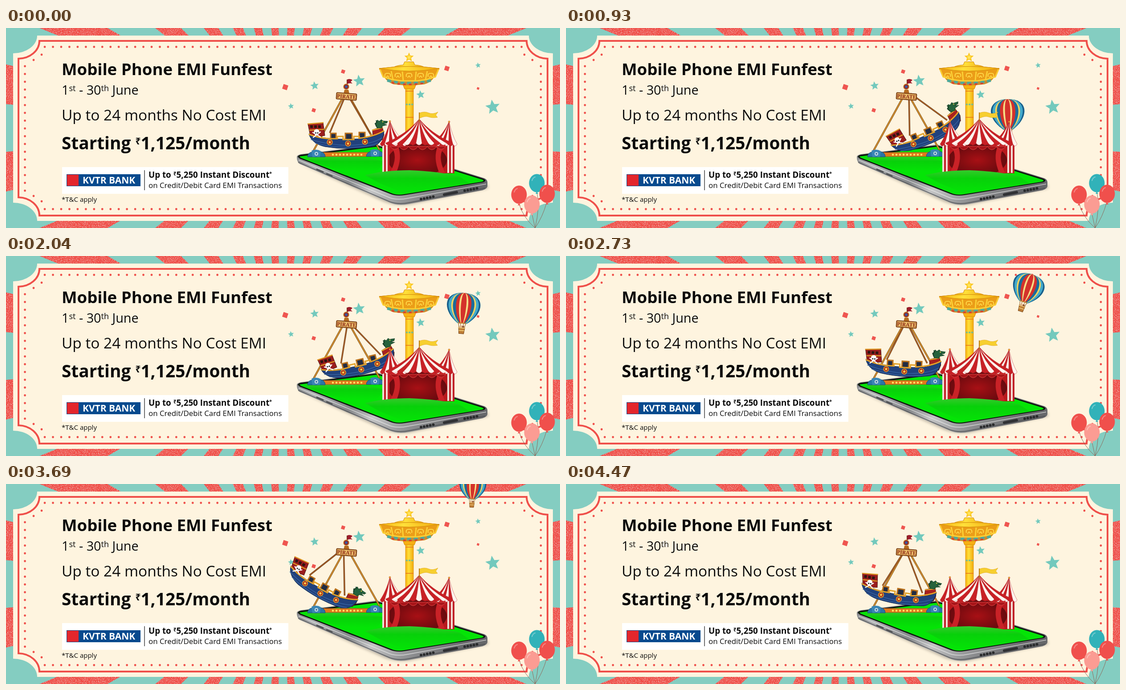
Recreate the animation shown at these times as an HTML page. Size 1244 px wide and 450 px high, loop 4.5 s.

```html
<!DOCTYPE html>
<html lang="en">
<head>
<meta charset="utf-8">
<title>Phone instalment offer</title>
<style>
  html, body { margin: 0; width: 100%; height: 100%; overflow: hidden; background: #84cdc1; }
  svg { position: absolute; left: 0; top: 0; width: 1244px; height: 450px; }
  #back { will-change: transform; }
  text { font-family: "Open Sans", "Noto Sans", sans-serif; font-weight: 500; fill: #0b0b0b; }
  .bold { font-weight: 700; }
</style>
</head>
<body>
<svg id="back" viewBox="0 0 1244 450">
  <defs>
    <filter id="speckle" x="0" y="0" width="100%" height="100%">
      <feTurbulence type="fractalNoise" baseFrequency=".7" numOctaves="2" seed="4"/>
      <feColorMatrix values="0 0 0 0 .86  0 0 0 0 .48  0 0 0 0 .45  7 0 0 0 -3.9"/>
      <feComposite in2="SourceAlpha" operator="in" result="dots"/>
      <feMerge><feMergeNode in="SourceGraphic"/><feMergeNode in="dots"/></feMerge>
    </filter>
  </defs>
  <rect width="1244" height="450" fill="#84cdc1"/>
  <path id="rays" fill="#ef4f4a" filter="url(#speckle)"/>
  <path fill="#fef4df" d="M70 17H1174A54 40 0 0 0 1228 57V393A54 41 0 0 0 1174 434H70A54 41 0 0 0 16 393V57A54 40 0 0 0 70 17Z"/>
  <path fill="none" stroke="#ef4f4a" stroke-width="4" d="M75 29H1169A48 40 0 0 0 1216 69V381A48 41 0 0 0 1169 422H75A48 41 0 0 0 28 381V69A48 40 0 0 0 75 29Z"/>
  <g id="beads" fill="#ef4f4a"></g>

  <text class="bold" x="125" y="106" font-size="36.6">Mobile Phone EMI Funfest</text>
  <text y="150" font-size="28.8"><tspan x="125">1</tspan><tspan font-size="18" dy="-8">st</tspan><tspan dy="8"> - 30</tspan><tspan font-size="18" dy="-8">th</tspan><tspan dy="8"> June</tspan></text>
  <text x="125" y="208" font-size="33.4">Up to 24 months No Cost EMI</text>
  <text class="bold" x="125" y="273" font-size="38.8">Starting <tspan font-size="21" dy="-11">₹</tspan><tspan dy="11">1,125/month</tspan></text>
  <rect x="126" y="313" width="508" height="60" fill="#fff"/>
  <rect x="136" y="329" width="166" height="27" fill="#064a8e"/>
  <rect x="137" y="330" width="26" height="25" fill="#e3262c"/>
  <text class="bold" x="172" y="350" font-size="21" style="fill:#fff">KVTR BANK</text>
  <path d="M311 320V365" stroke="#222" stroke-width="1.3"/>
  <text class="bold" x="320" y="337" font-size="18.8">Up to <tspan font-size="12" dy="-5">₹</tspan><tspan dy="5">5,250 Instant Discount</tspan><tspan font-size="10" dy="-6">*</tspan></text>
  <text x="320" y="360" font-size="16.9">on Credit/Debit Card EMI Transactions</text>
  <text x="125" y="391" font-size="15">*T&amp;C apply</text>

  <g id="confetti"></g>
  <g stroke="#8d6a5c" fill="none">
    <path d="M1152 395Q1160 425 1188 450M1192 369Q1200 400 1188 450M1214 393Q1205 425 1188 450M1181 418L1188 450"/>
  </g>
  <g id="party"></g>
</svg>

<svg viewBox="0 0 1244 450">
  <defs>
    <linearGradient id="gold">
      <stop offset="0" stop-color="#f5ae10"/><stop offset=".4" stop-color="#ffe03a"/><stop offset="1" stop-color="#f0a80e"/>
    </linearGradient>
    <linearGradient id="metal" x2="1" y2=".4">
      <stop offset="0" stop-color="#6f7073"/><stop offset=".2" stop-color="#aeb0b2"/><stop offset=".45" stop-color="#85878a"/>
      <stop offset=".6" stop-color="#c4c5c6"/><stop offset="1" stop-color="#67686b"/>
    </linearGradient>
    <linearGradient id="hill" x2="0" y2="1">
      <stop offset="0" stop-color="#35c92c"/><stop offset=".35" stop-color="#08d00a"/><stop offset="1" stop-color="#04e406"/>
    </linearGradient>
    <radialGradient id="stage"><stop offset="0" stop-color="#a81015"/><stop offset="1" stop-color="#680a0e"/></radialGradient>
    <filter id="soft"><feGaussianBlur stdDeviation="3"/></filter>
  </defs>

  <!-- phone -->
  <path d="M655 303L850 391Q885 403 920 394L1082 361V352L870 380Z" fill="#6b6255" opacity=".45" filter="url(#soft)"/>
  <path d="M653 290Q653 286 662 284L833 262L1074 338Q1082 341 1081 350V356Q1080 362 1070 365L905 396Q880 401 862 393L660 306Q653 302 653 290Z" fill="url(#metal)"/>
  <path d="M655 290Q656 286 663 285L833 264L1072 339Q1081 343 1072 347L895 376Q876 379 862 373L660 294Z" fill="#101510"/>
  <path d="M659 289L833 267L1069 341Q1076 344 1068 346L894 374Q877 377 864 371L662 292Z" fill="#04e406"/>
  <path d="M657 297L862 382Q880 388 903 383L1078 351" fill="none" stroke="#efefef" stroke-width="1.5" opacity=".7"/>
  <path d="M656 302L862 391Q882 398 905 393L1076 360" fill="none" stroke="#4c4d50" stroke-width="2" opacity=".7"/>
  <path d="M932 385L962 379M1030 366L1062 360" stroke="#292a2c" stroke-width="6" stroke-linecap="round" stroke-dasharray="0 7"/>
  <path d="M984 375L1012 369.5" stroke="#303134" stroke-width="6" stroke-linecap="round"/>
  <path d="M698 318L712 324M720 328L732 333" stroke="#505255" stroke-width="3" stroke-linecap="round"/>
  <path d="M672 292Q755 280 850 300L835 320Q780 330 700 306Z" fill="url(#hill)"/>

  <!-- drop tower -->
  <g stroke="#d38a0a">
    <rect x="897" y="122" width="18" height="140" fill="url(#gold)" stroke-width=".7"/>
    <path d="M890 124H922L917 137H895Z" fill="#f7b013"/>
    <path d="M897 142H915M897 201H915" stroke="#e8701c" stroke-width="1.5"/>
    <path d="M866 91Q874 84 892 83L895 76H915L918 83Q936 84 944 91Z" fill="url(#gold)"/>
    <path d="M850 110Q905 120 961 110Q956 121 940 126Q905 131 870 126Q855 121 850 110Z" fill="#c98f35"/>
    <path d="M856 118Q905 129 954 118" fill="none" stroke="#4fa99b" stroke-width="6" stroke-dasharray="9 6"/>
    <path d="M866 123Q905 131 944 123" fill="none" stroke="#d9452e" stroke-width="4" stroke-dasharray="6 7"/>
    <path d="M838 91Q905 82 973 91L965 110L944 116L923 119H888L867 116L846 110Z" fill="#eb9d18"/>
    <path d="M838 91Q905 82 973 91Q905 103 838 91Z" fill="url(#gold)"/>
    <path d="M840 93L847 110L867 116L888 119H923L944 116L964 110L971 93M865 97L869 116M890 98L892 119M921 98L919 119M946 97L942 116" fill="none" stroke="#fbcf35" stroke-width="3"/>
  </g>
  <g id="swirls" fill="none" stroke="#ffd84a" stroke-width="2"></g>
  <g id="towerStars"></g>

  <g id="balloon"></g>

  <!-- swing frame -->
  <g fill="none" stroke-linecap="round">
    <path d="M760 150L690 277M769 150L838 273" stroke="#7d4a12" stroke-width="4"/>
    <path d="M760 150L690 277M769 150L838 273" stroke="#dd9a34" stroke-width="2"/>
  </g>
  <g id="ship">
    <path d="M763 150L727 236M767 150L818 238" stroke="#6b3413" stroke-width="3.4"/>
    <path d="M763 150L727 236M767 150L818 238" stroke="#c67a30" stroke-width="1.2"/>
    <path d="M678 216L712 213L716 242L684 247Z" fill="#9a1d1d" stroke="#4a1515"/>
    <path d="M677 216L713 213M681 230L714 228" stroke="#dd9722" stroke-width="2.4"/>
    <path d="M683 222H709" stroke="#2e1512" stroke-width="6" stroke-dasharray="6 3"/>
    <path d="M823 229L845 222L849 240L845 252L824 250Z" fill="#a8211e" stroke="#4a1515"/>
    <path d="M729 252V237H741V252M762 253V237H777V253M793 251V235H806V251" fill="#222c42" stroke="#b9701c" stroke-width="3"/>
    <path d="M680 238Q700 246 724 248Q770 253 812 247Q835 242 849 232Q847 258 826 266Q770 276 716 267Q686 260 680 238Z" fill="#21417c" stroke="#152a50"/>
    <path d="M684 251Q730 264 770 264Q822 262 844 247M694 259Q730 269 770 269Q812 268 835 259" fill="none" stroke="#3b6aa8" stroke-width="1.2"/>
    <path d="M680 239Q700 247 724 249H744V244H757V251H781V244H793V248Q828 244 849 231" fill="none" stroke="#e3a229" stroke-width="3"/>
    <path d="M822 230L846 224" stroke="#e8a92f" stroke-width="2.4"/>
    <path d="M833 225Q828 213 834 207L838 210L843 206L846 209L857 210L855 214L847 215L855 218L847 220Q844 220 844 225Z" fill="#25623c" stroke="#143d26"/>
    <path d="M832 222L829 215L833 212L831 208" fill="none" stroke="#143d26" stroke-width="2"/>
    <circle cx="846" cy="211" r="1.2" fill="#ffe04a"/>
    <path d="M689 235L706 245M706 234L690 246" stroke="#fff" stroke-width="2.4" stroke-linecap="round"/>
    <path d="M692 236A6 6 0 1 1 703 236L701 241H694Z" fill="#fff"/>
    <circle cx="695.500" cy="236" r="1.6" fill="#222"/><circle cx="700" cy="236" r="1.6" fill="#222"/>
    <g id="wheels"></g>
  </g>
  <path d="M766 130V116" stroke="#6b3413" stroke-width="2"/>
  <path d="M766 116Q772 113 778 117L774 121L778 125Q771 123 766 126Z" fill="#9c1c2a"/>
  <circle cx="764" cy="132" r="6" fill="#8f2532" stroke="#c98a2b" stroke-width="1.6"/>
  <circle cx="764" cy="132" r="2.8" fill="#3461a3"/>
  <path d="M760 139H769L771 148H758Z" fill="#b56c20"/>
  <g transform="rotate(4 764 154)">
    <rect x="742" y="147" width="45" height="14" rx="2" fill="#e9bb68" stroke="#7a3d13" stroke-width="2"/>
    <text class="bold" x="764.5" y="158.3" text-anchor="middle" font-size="11.5" style="fill:#8f2c18;font-family:'Noto Serif',serif">PIRATE</text>
  </g>
  <rect x="706" y="280" width="116" height="9" rx="2" fill="#e07a1b" stroke="#b4501b"/>
  <path d="M734 285H800" stroke="#ffe264" stroke-width="4.5" stroke-linecap="round" stroke-dasharray="0 8"/>
  <g id="feet"></g>

  <!-- tent -->
  <path d="M845 256H1007V327H845Z" fill="#b8181d"/>
  <ellipse cx="924" cy="297" rx="66" ry="36" fill="url(#stage)"/>
  <path d="M862 264Q884 286 862 326H876Q891 292 880 264ZM987 264Q966 286 986 326H973Q958 292 970 264Z" fill="#c92227"/>
  <g id="walls"></g>
  <path d="M862 266Q872 280 883 267Q893 281 904 267Q914 281 925 267Q935 281 946 267Q956 281 967 267Q978 280 988 266Z" fill="#a81419" stroke="#dd4a46"/>
  <g id="roof" stroke="#b32124" stroke-width=".5"></g>
  <path d="M928 212V190" stroke="#bb7a14" stroke-width="2"/>
  <path d="M929 191Q940 187 949 191T970 189L965 196L969 201Q957 203 949 200T929 203Z" fill="#f7cf2f" stroke="#dfa51a" stroke-width=".7"/>
  <path d="M806 331Q850 320 906 320Q970 322 1018 334L1040 349L894 372L840 350Z" fill="url(#hill)"/>
</svg>

<script>
const $ = id => document.getElementById(id);
const times = (n, fn) => Array.from({ length: n }, (_, i) => fn(i)).join('');
const fill = (id, markup) => { $(id).innerHTML = markup; };
const dot = (x, y, r, color = '') => `<circle cx="${x}" cy="${y}" r="${r}" ${color && `fill="${color}"`}/>`;

function star(x, y, r, color, turn = 0) {
  const points = times(10, i => {
    const a = (i * 36 - 90 + turn) * Math.PI / 180, d = i % 2 ? r * .45 : r;
    return `${(x + d * Math.cos(a)).toFixed(1)},${(y + d * Math.sin(a)).toFixed(1)} `;
  });
  return `<polygon points="${points}" fill="${color}"/>`;
}

// One stripe of a tent roof, sagging from the peak to the eaves.
function stripe(px, py, x0, x1, base, color) {
  const sag = x => `${px + (x - px) * .38} ${py + (base - py) * .62}`;
  const mid = (x0 + x1) / 2;
  return `<path fill="${color}" d="M${px} ${py}Q${sag(x0)} ${x0} ${base}Q${mid} ${base + 9} ${x1} ${base}Q${sag(x1)} ${px} ${py}Z"/>`;
}
function cone(px, py, left, right, base, n) {
  const w = (right - left) / n;
  return times(n, i => stripe(px, py, left + i * w, left + (i + 1) * w, base, i % 2 ? '#fff4ee' : '#c82025'));
}

function buildRays() {
  const step = 360 / 28;
  const edge = deg => {
    const a = deg * Math.PI / 180;
    return `${622 + 1000 * Math.cos(a)} ${225 + 1400 * Math.sin(a)}`;
  };
  $('rays').setAttribute('d', times(28, i => {
    const middle = (i + .5) * step;
    return `M622 225L${edge(middle - 2.9)}L${edge(middle + 2.9)}Z`;
  }));
}

function buildScene() {
  buildRays();
  const across = times(59, i => dot(87 + i * 18.46, 42.5, 2.4) + dot(87 + i * 18.46, 407.5, 2.4));
  const down = times(17, i => dot(42.5, 86 + i * 17.5, 2.4) + dot(1201, 86 + i * 17.5, 2.4));
  const corners = [[80, 60], [62, 72]].map(([x, y]) =>
    dot(x, y, 2.4) + dot(1244 - x, y, 2.4) + dot(x, 450 - y, 2.4) + dot(1244 - x, 450 - y, 2.4)).join('');
  fill('beads', across + down + corners);

  const teal = [[693, 130, 10], [793, 119, 14], [640, 176, 7], [931, 150, 10], [1060, 84, 6.5], [1093, 178, 17]];
  const red = [[757, 98, 8], [627, 133, 11], [691, 185, 8], [990, 91, 10], [1060, 136, 5]];
  fill('confetti', teal.map(([x, y, r]) => star(x, y, r, '#73c9bd', -8)).join('') +
    red.map(([x, y, s]) => `<rect x="${x - s / 2}" y="${y - s / 2}" width="${s}" height="${s}" fill="#ef5550" transform="rotate(18 ${x} ${y})"/>`).join(''));

  const party = [[1192, 349, '#31b2b9'], [1152, 375, '#f0504c'], [1215, 373, '#f0504c'], [1181, 397, '#fb9c93']];
  fill('party', party.map(([x, y, c]) =>
    `<ellipse cx="${x}" cy="${y}" rx="17.5" ry="20.5" fill="${c}"/><path d="M${x - 3} ${y + 24}L${x} ${y + 19}L${x + 3} ${y + 24}Z" fill="${c}"/>` +
    `<path d="M${x - 11} ${y - 5}Q${x - 9} ${y - 13} ${x - 3} ${y - 14}" stroke="#fff" stroke-width="2" fill="none" opacity=".35"/>`).join(''));

  fill('swirls', [857, 880, 905, 931, 954].map(x =>
    `<path d="M${x - 6} 110Q${x - 8} 101 ${x} 102Q${x + 8} 101 ${x + 6} 110M${x - 3} 112Q${x} 104 ${x + 3} 112"/>`).join(''));
  fill('towerStars', star(905, 66, 11, '#fbc51b') + star(905, 66, 6, '#ffe45a') +
    [900, 906, 912].map(x => star(x, 172, 3, '#5fbdab')).join(''));

  fill('wheels', [[727, 257], [768, 260], [806, 256]].map(([x, y]) =>
    dot(x, y, 6.6, '#e3a02a') + dot(x, y, 5, '#a6211d') + star(x, y, 4.2, '#ffd548')).join(''));

  fill('feet', [[697, 283], [829, 282]].map(([x, y]) =>
    `<path d="M${x - 20} ${y + 7}A11 11 0 0 1 ${x + 2} ${y + 7}ZM${x - 4} ${y + 7}A11 11 0 0 1 ${x + 20} ${y + 7}Z" fill="#2a74a5" stroke="#1b4d73"/>` +
    `<path d="M${x - 11} ${y - 7}Q${x} ${y - 12} ${x + 10} ${y - 6}L${x + 8} ${y + 7}H${x - 9}Z" fill="#3a86b5"/>` +
    dot(x, y, 4, '#c9dde6') + dot(x, y, 2, '#2f6f9f')).join(''));

  fill('walls', times(4, i => [845, 991].map(x =>
    `<rect x="${x + i * 4}" y="260" width="4" height="66" fill="${i % 2 ? '#c02027' : '#f2ded6'}"/>`).join('')));
  fill('roof', cone(862, 210, 840, 900, 261, 6) + cone(995, 211, 956, 1013, 261, 6) + cone(928, 205, 852, 1003, 259, 11) +
    dot(862, 210, 2, '#eab52c') + dot(995, 211, 2, '#eab52c'));

  const gores = [[1, '#175f8c'], [.9, '#43aacb'], [.74, '#f2d45f'], [.64, '#1b6c9b'], [.46, '#d4322b'], [.27, '#f5dd85'], [.16, '#d4322b']];
  fill('balloon', '<path d="M-9 31L-6 43M9 31L6 43M-3 33V43M3 33V43" stroke="#9a6428" stroke-width="1.2"/>' +
    gores.map(([k, c]) => `<path fill="${c}" d="M0 -35C${49 * k} -35 ${48 * k} 8 ${10 * k} 34H${-10 * k}C${-48 * k} 8 ${-49 * k} -35 0 -35Z"/>`).join('') +
    '<path d="M-9 33H9" stroke="#c5852b" stroke-width="2"/>' +
    '<path d="M-7 43H7L5.500 57H-5.500Z" fill="#bd7b34" stroke="#754318"/><path d="M-8 44H8M-6 50H6" stroke="#f1cb78" stroke-width="2"/>' +
    dot(-2, 41, 2.6, '#e0b182') + dot(3, 41, 2.3, '#8a4c26'));
}

// Smooth curve through rows of [time, value, value, ...].
function along(keys, t) {
  let i = 0;
  while (i < keys.length - 2 && t >= keys[i + 1][0]) i++;
  const a = keys[i], b = keys[i + 1], span = b[0] - a[0];
  const u = Math.min(1, (t - a[0]) / span);
  const before = keys[i - 1] || a, after = keys[i + 2] || b;
  return a.slice(1).map((va, j) => {
    const c = j + 1, vb = b[c];
    const ma = (vb - before[c]) / (b[0] - before[0]) * span;
    const mb = (after[c] - va) / (after[0] - a[0]) * span;
    return va + u * (ma + u * (3 * (vb - va) - 2 * ma - mb + u * (2 * (va - vb) + ma + mb)));
  });
}

const LOOP = 4500;
const swing = [[0, 0], [570, 13], [930, 23.8], [1330, 30], [1530, 28.4], [2040, 13.6], [2730, -3.8], [3690, -29], [3800, -29.3], [4320, -14.5], [4470, -9.3]];
// time, x, y, tilt, scale
const flight = [[0, 945, 276, 0, 1], [930, 992, 195, -2, 1], [1530, 1016, 152, 0, 1], [2040, 1027, 118, 5, 1],
  [2730, 1037, 73, 18, .95], [3690, 1048, 7, 3, .8], [4500, 1057, -54, -5, .75]];

function draw(t) {
  const [angle] = along(swing, t);
  $('ship').setAttribute('transform', `rotate(${-angle} 764 133)`);
  const [x, y, tilt, scale] = along(flight, t);
  $('balloon').setAttribute('transform', `translate(${x} ${y}) rotate(${tilt}) scale(${scale})`);
}

buildScene();
const start = performance.now();
function tick() {
  const t = (performance.now() - start) % LOOP;
  draw(Math.floor(t / 30) * 30);
  requestAnimationFrame(tick);
}
tick();
</script>
</body>
</html>
```
